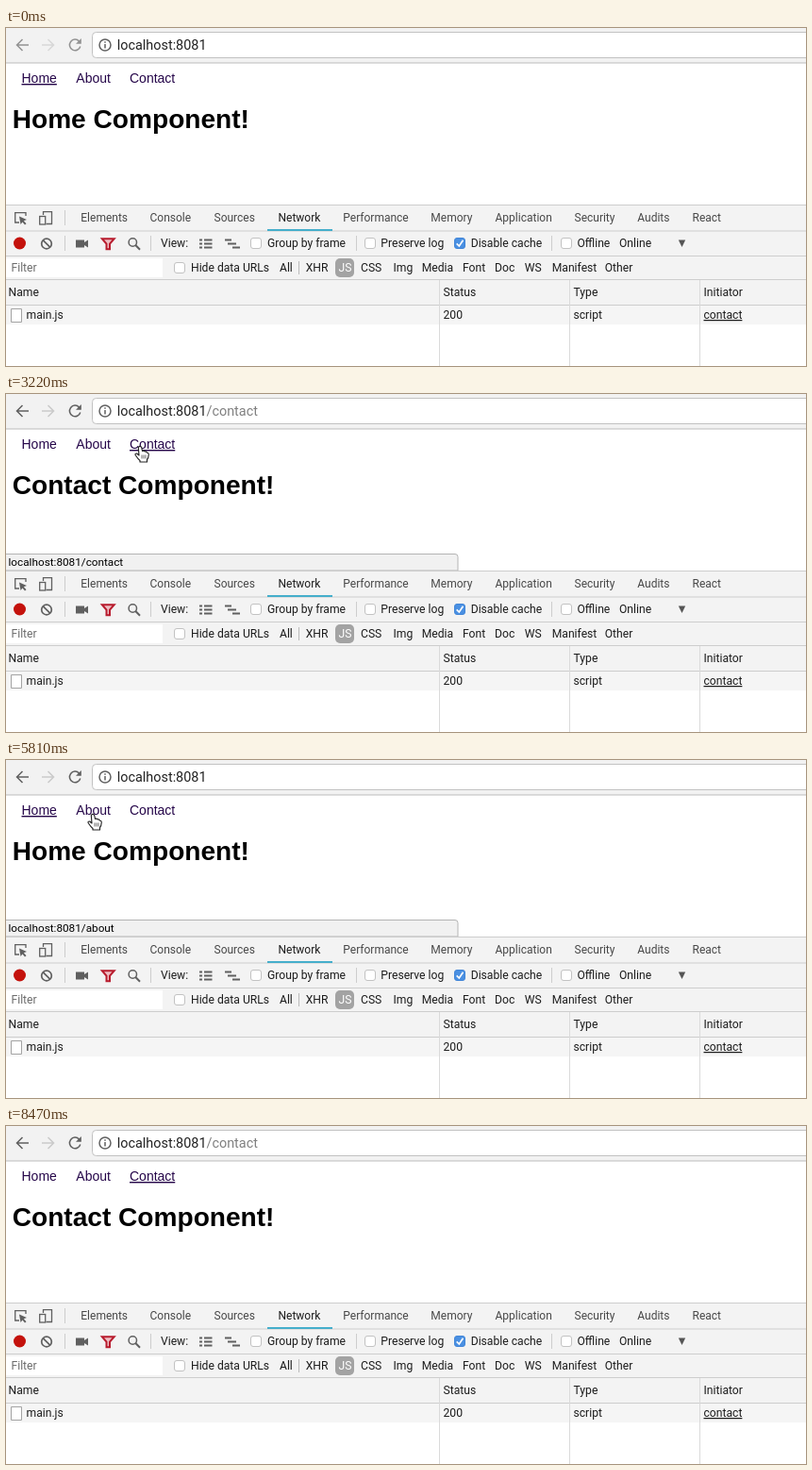
Animation of 848 by 358 pixels, one loop 8610 ms. Source, as an HTML page:

```html
<!DOCTYPE html>
<html lang="en">
<head>
<meta charset="utf-8">
<title>Router demo</title>
<style>
  html, body { margin: 0; width: 100%; height: 100%; overflow: hidden; background: #fff; }
  svg { display: block; width: 100%; height: 100%; }
  text { font: 12.15px Roboto, Arial, sans-serif; fill: #1c1c1c; white-space: pre; }
  .tab { font-size: 12px; fill: #484848; }
  .tab.on { fill: #1c1c1c; }
  .url { font-size: 14.4px; fill: #222; }
  .link { font: 14px "Liberation Sans", Arial, sans-serif; fill: #26074a; }
  .title { font: bold 28.1px "Liberation Sans", Arial, sans-serif; fill: #000; }
  .tip { font-size: 11.75px; fill: #000; }
  .dim { fill: #6c6c6c; }
  .white { fill: #fff; }
  .under { text-decoration: underline; }
  .ico { fill: none; stroke: #606060; stroke-width: 1.5; }
</style>
</head>
<body>
<svg viewBox="0 0 848 358">
  <!-- browser toolbar -->
  <rect width="848" height="37" fill="#f2f2f2"/>
  <rect y="36.5" width="848" height="1" fill="#bdbdbd"/>
  <rect x="91.5" y="4.5" width="780" height="27" rx="4" fill="#fff" stroke="#c2c2c2"/>
  <g class="ico">
    <g id="buttons">
      <path d="M24 18H11.5M17.5 12L11.5 18L17.5 24"/>
      <path d="M38 18H50.5M44.500 12L50.500 18L44.500 24" stroke="#cacaca"/>
      <path d="M77.500 14A5.800 5.800 0 1 0 78.800 19.500"/>
      <path d="M79.800 11V16.800H74Z" fill="#606060" stroke="none"/>
    </g>
    <circle cx="105" cy="18" r="6"/>
    <path d="M105 17V21.500M105 14.200V15.700"/>
  </g>
  <text class="url" x="117.800" y="23">localhost:8081<tspan id="path" fill="#808080"></tspan></text>

  <!-- page -->
  <g id="nav"></g>
  <text class="title" id="title" x="6.700" y="106"></text>
  <g id="tip">
    <path d="M-1 169.500H476Q479 169.500 479 172.500V187H-1Z" fill="#f1f1f1" stroke="#b4b4b4"/>
    <text class="tip" id="tipText" x="2.500" y="182"></text>
  </g>

  <!-- developer panel -->
  <rect y="187" width="848" height="107" fill="#f3f3f3"/>
  <rect y="294" width="848" height="64" fill="#fff"/>
  <rect y="294" width="848" height="20" fill="#f5f5f5"/>
  <rect y="244" width="166" height="20" fill="#fff"/>
  <g id="lines"></g>
  <rect x="277" y="213" width="69" height="2" fill="#45aecb"/>
  <rect x="349" y="244" width="20" height="20" rx="5" fill="#a3a3a3"/>

  <g class="ico">
    <path d="M14 206H9.700V195.700H21V199" stroke-width="1.300"/>
    <path d="M14 199.500L22 203L18.800 204.300L21.500 207.300L20 208.500L17.500 205.500L15.500 208Z" fill="#606060" stroke="none"/>
    <path d="M39.500 198V194.700H48.500V207.500H42.500" stroke-width="1.300"/>
    <rect x="35.700" y="199.500" width="6" height="8.500" stroke-width="1.300"/>
    <circle cx="14.500" cy="228" r="6.500" fill="#c4120c" stroke="none"/>
    <circle cx="43" cy="228.500" r="5.300" stroke-width="1.700"/>
    <path d="M39.300 224.800L46.700 232.200" stroke-width="1.700"/>
    <path d="M74 224.500H83V227L87 224.500V232.500L83 230V232.500H74Z" fill="#606060" stroke="none"/>
    <path d="M101.800 223.200H114.700L110 228.700V234.300H106.500V228.700Z" fill="#eebdc2" stroke="#b81c2e" stroke-width="2"/>
    <circle cx="134.300" cy="227" r="4.200"/>
    <path d="M137.300 230L142 234.700" stroke-width="2"/>
    <path d="M205 224.500H208M210 224.500H218.500M205 228.500H208M210 228.500H218.500M205 232.500H208M210 232.500H218.500" stroke-width="2"/>
    <path d="M232 224.500H239M235 228.500H244M240 232.500H248" stroke-width="2"/>
    <path d="M712.800 224.500H720.200L716.500 232Z" fill="#555" stroke="none"/>
    <path d="M5.500 297.500H16.500V311.500H5.500Z" fill="#fff" stroke="#a4a4a4" stroke-width="1"/>
  </g>
  <g id="boxes"></g>
  <path d="M477.700 228.300L480.300 231L484.500 224.700" fill="none" stroke="#fff" stroke-width="1.700"/>
  <g id="labels"></g>

  <!-- pointers, tip at 0,0 -->
  <g id="arrow">
    <path d="M0 0V14.500L3.300 11.400L5.800 16.900L8.400 15.800L6 10.400H10.500Z" fill="#111" stroke="#fff" stroke-width="1"/>
  </g>
  <g id="hand">
    <path d="M-1.700 1.500Q0 -.800 1.700 1.500L2.500 5.500Q4.300 4.500 5.200 6Q7 5.500 7.500 7.200Q9.500 7.200 9.200 9.500Q9 13 7.500 14.500V17H0V15.500Q-2 14 -4.800 9.800Q-5.500 7.700 -3.300 8L-1 10Z" fill="#fff" stroke="#222" stroke-width="1.150" stroke-linejoin="round"/>
    <path d="M2 9.500V13.500M4 9.500V13.500M6 9.500V13.500" stroke="#444" stroke-width=".800"/>
  </g>
</svg>
<script>
const $ = id => document.getElementById(id);
const LOOP = 8610, STEP = 70;

function add(parent, tag, attrs, text) {
  const el = document.createElementNS("http://www.w3.org/2000/svg", tag);
  for (const k in attrs) el.setAttribute(k, attrs[k]);
  if (text) el.textContent = text;
  $(parent).append(el);
  return el;
}

const line = (x, y, width, height, fill = "#cdcdcd") =>
  add("lines", "rect", { x, y, width, height, fill });
[187, 214.5, 241, 266, 293].forEach(y => line(0, y, 848, 1));
[459, 597, 735].forEach(x => line(x, 267, 1, 91, "#dadada"));
line(62, 193, 1, 16);
[62, 153, 371, 578].forEach(x => line(x, 220, 1, 16));
line(310, 247, 1, 14, "#bbb");

[[259, 222], [380, 222], [475, 222], [588, 222], [178, 248]].forEach(([x, y]) => {
  const on = x === 475;
  add("boxes", "rect", { x: x + .5, y: y + .5, width: 11, height: 11, rx: 2.5,
    fill: on ? "#4a90e2" : "#fff", stroke: on ? "#4286d8" : "#c2c2c2" });
});

const row = (y, items, cls = "") => items.forEach(([x, s, c = cls]) =>
  add("labels", "text", { x, y, class: c }, s));
row(205, [[79.3, "Elements"], [152.5, "Console"], [220.5, "Sources"], [288.5, "Network", "tab on"],
  [357.3, "Performance"], [450.3, "Memory"], [518.5, "Application"], [602.5, "Security"],
  [669.3, "Audits"], [727.5, "React"]], "tab");
row(232, [[164, "View:"], [277, "Group by frame"], [397.3, "Preserve log"],
  [492.7, "Disable cache"], [605.5, "Offline"], [650, "Online"]]);
row(258, [[5.5, "Filter", "dim"], [196, "Hide data URLs"], [290, "All"], [317.7, "XHR"],
  [352.5, "JS", "white"], [376, "CSS"], [410.5, "Img"], [440.7, "Media"], [484, "Font"],
  [518, "Doc"], [549.7, "WS"], [578.7, "Manifest"], [634.7, "Other"]]);
row(284, [[2.5, "Name"], [463.5, "Status"], [601.5, "Type"], [739.5, "Initiator"]]);
row(308, [[21.5, "main.js"], [463.5, "200"], [601.5, "script"], [739.5, "contact", "under"]]);

const links = [["Home", 16.5, 54], ["About", 74.3, 111], ["Contact", 131, 180]].map(
  ([name, x, end]) => ({ name, x, end, el: add("nav", "text", { x, y: 58 }, name) }));

// [time, value] holds until the next entry
const pages = [[0, "Home"], [1960, "About"], [3080, "Contact"],
  [5110, "Home"], [6020, "About"], [6930, "Contact"]];
const tips = [[0, null], [1540, "About"], [2800, "Contact"], [4060, null],
  [4340, "Home"], [5600, "About"], [6790, "Contact"], [7770, null]];

// [time, x, y, ease into this point]
const smooth = p => p * p * (3 - 2 * p), speedUp = p => p * p;
const moves = [[700, 74, 17], [1050, 74, 17], [1400, 82, 57], [1470, 84, 57], [1750, 92, 57],
  [2450, 92, 57], [2870, 142, 55], [3710, 142, 55], [3990, 76, 62], [4340, 42, 54],
  [4830, 42, 54], [4900, 44, 55], [5180, 44, 55], [5670, 92, 57], [6160, 92, 57],
  [6720, 142, 55], [7490, 142, 55], [8330, 345, 194, speedUp], [8400, 415, 333], [8470, 430, 380]];

const at = (table, t) => table.filter(e => e[0] <= t).pop()[1];
const route = name => name === "Home" ? "" : "/" + name.toLowerCase();

function pointer(t) {
  const i = moves.findIndex(m => m[0] > t);
  if (i < 1) return null;
  const [t0, x0, y0] = moves[i - 1], [t1, x1, y1, ease = smooth] = moves[i];
  const p = ease((t - t0) / (t1 - t0));
  return [x0 + (x1 - x0) * p, y0 + (y1 - y0) * p];
}

function show(id, pos) {
  $(id).style.display = pos ? "" : "none";
  if (pos) $(id).setAttribute("transform", `translate(${pos})`);
}

function draw(t) {
  const page = at(pages, t), tip = at(tips, t), pos = pointer(t);
  $("path").textContent = route(page);
  $("title").textContent = page + " Component!";
  links.forEach(l => l.el.setAttribute("class", l.name === page ? "link under" : "link"));
  $("tip").style.display = tip ? "" : "none";
  if (tip) $("tipText").textContent = "localhost:8081" + route(tip);
  $("buttons").style.opacity = t < 700 ? .65 : 1;
  const over = pos && pos[1] > 45 && pos[1] < 61 &&
    links.some(l => pos[0] >= l.x && pos[0] <= l.end);
  show("hand", over && pos);
  show("arrow", !over && pos);
}

const start = performance.now();
function tick() {
  const t = (performance.now() - start) % LOOP;
  draw(Math.floor(t / STEP) * STEP);
  requestAnimationFrame(tick);
}
tick();
</script>
</body>
</html>
```
